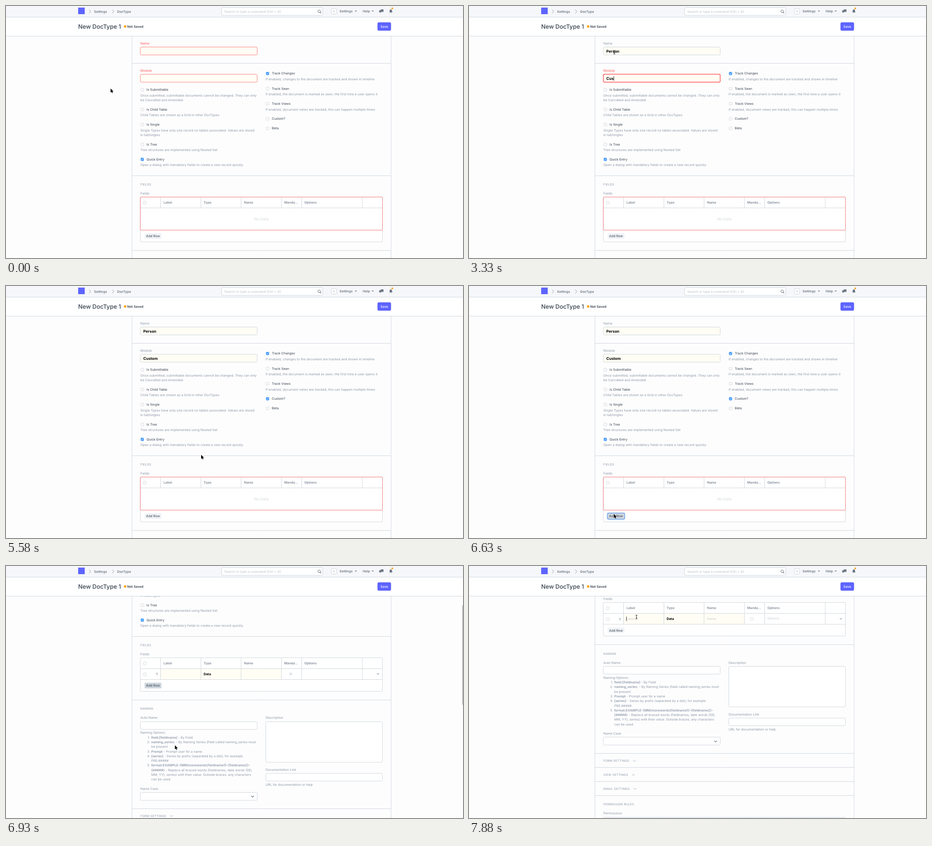
Animation of 1007x556 px, one loop 8 s. Source, as an HTML page with a canvas:

```html
<!DOCTYPE html>
<html lang="en">
<head>
<meta charset="utf-8">
<title>New DocType</title>
<style>
html, body { margin: 0; width: 100%; height: 100%; overflow: hidden; background: #fff; }
canvas { display: block; width: 1007px; height: 556px; }
</style>
</head>
<body>
<canvas id="stage"></canvas>
<script>
const W = 1007, H = 556, LOOP = 8000;
const canvas = document.getElementById('stage');
const dpr = window.devicePixelRatio || 1;
canvas.width = W * dpr;
canvas.height = H * dpr;
const ctx = canvas.getContext('2d');
ctx.textRendering = 'geometricPrecision';

const RED = '#ff5858', LINE = '#d1d8dd', MUTED = '#8d99a6', DARK = '#36414c';
const BEIGE = '#fffdf4', PAGE = '#fdfdfe', BRAND = '#5e64ff', ORANGE = '#ffa00a', BLUE = '#3b99fc';

let oy = 0; // scroll offset of whatever is being drawn
const snap = v => Math.round(v - 0.5) + 0.5;

function text(str, x, y, { color = MUTED, size = 7.18, weight = 400, align = 'left', spacing = 0 } = {}) {
  ctx.font = `${weight} ${size}px Inter, sans-serif`;
  ctx.letterSpacing = spacing + 'px';
  ctx.textAlign = align;
  ctx.fillStyle = color;
  ctx.fillText(str, x, y - oy + size * 0.364);
  return ctx.measureText(str).width;
}

function rect(x, y, w, h, { fill, stroke, r = 0, lw = 1 } = {}) {
  const top = snap(y - oy);
  ctx.beginPath();
  ctx.roundRect(x, top, w, h, r);
  if (fill) { ctx.fillStyle = fill; ctx.fill(); }
  if (stroke) { ctx.strokeStyle = stroke; ctx.lineWidth = lw; ctx.stroke(); }
}

function path(points, color, lw = 1, close = false) {
  ctx.beginPath();
  points.forEach(([x, y], i) => ctx[i ? 'lineTo' : 'moveTo'](x, y - oy));
  if (close) { ctx.closePath(); ctx.fillStyle = color; ctx.fill(); return; }
  ctx.strokeStyle = color;
  ctx.lineWidth = lw;
  ctx.stroke();
}

function hline(x1, x2, y, color = LINE) {
  const s = snap(y - oy) + oy;
  path([[x1, s], [x2, s]], color);
}

function vlines(xs, y1, y2) {
  xs.forEach(x => path([[x, y1], [x, y2]], LINE));
}

function dot(x, y, r, color) {
  ctx.beginPath();
  ctx.arc(x, y - oy, r, 0, Math.PI * 2);
  ctx.fillStyle = color;
  ctx.fill();
}

function chevron(x, y) {
  path([[x - 3, y - 1.5], [x, y + 1.5], [x + 3, y - 1.5]], MUTED, 0.8);
}

function triangle(x, y, w, h, color) {
  path([[x - w, y - h], [x + w, y - h], [x, y + h]], color, 1, true);
}

function checkbox(x, y, on) {
  const top = y - oy - 3.1;
  ctx.beginPath();
  ctx.roundRect(x - 3.1, top, 6.2, 6.2, 1.4);
  ctx.fillStyle = on ? BLUE : '#fff';
  ctx.fill();
  ctx.strokeStyle = on ? BLUE : '#c3c6ca';
  ctx.lineWidth = 0.7;
  ctx.stroke();
  if (on) path([[x - 1.7, y + 0.2], [x - 0.5, y + 1.6], [x + 1.8, y - 1.7]], '#fff', 1);
}

function check(x, y, label, notes = [], on = false) {
  checkbox(x + 4.3, y + 0.2, on);
  text(label, x + 13.7, y, { color: DARK });
  notes.forEach((n, i) => text(n, x, y + 12.6 + i * 10.3));
}

function heading(str, y, arrow) {
  const w = text(str, 296, y, { size: 6.6, spacing: 0.27 });
  if (arrow) chevron(296 + w + 11.5, y);
}

function field(label, y, { value = '', bad, focus, caret }) {
  text(label, 296, y, { color: bad ? RED : MUTED });
  rect(296, y + 8.2, 257.5, 17.5, { fill: BEIGE, stroke: bad ? RED : LINE, r: 2.4, lw: focus ? 1.5 : bad ? 0.75 : 1 });
  const w = text(value, 302.5, y + 17.5, { color: '#000', size: 8.4, weight: 700 });
  if (caret) caretLine(303 + w, y + 17.2);
}

function caretLine(x, y) {
  path([[x, y - 5], [x, y + 5]], '#111', 0.9);
}

function box(x, y, w, h) {
  rect(x, y, w, h, { fill: '#fff', stroke: LINE, r: 2.4 });
}

const columns = [340.5, 429.5, 518, 607, 651.5, 785];
const titles = [['Label', 347], ['Type', 435.5], ['Name', 524.5], ['Manda...', 613], ['Options', 657.5]];

function grid(s) {
  const bodyEnd = s.row ? 469.5 : 494.5, end = s.row ? 495.5 : 520.5;
  rect(296, 421.5, 533.5, end - 421.5, { fill: '#fff', stroke: LINE, r: 1.5 });
  if (s.row) {
    ctx.fillStyle = BEIGE;
    ctx.fillRect(341, 446 - oy, 266, 23);
  }
  vlines(columns, 422, s.row ? 469 : 445);
  hline(296, 829.5, 445.5);
  hline(296, 829.5, bodyEnd);
  checkbox(305.8, 434, false);
  titles.forEach(([t, x]) => text(t, x, 433, { weight: 600, color: '#7f8b98' }));

  if (s.row) {
    checkbox(305.8, 458, false);
    text('1', 334, 457.5, { color: DARK, align: 'right' });
    text('Data', 435.5, 457.3, { color: '#000', weight: 700 });
    triangle(819.5, 457.6, 3.5, 1.8, '#b8c2cc');
    if (s.edit) {
      const hint = { color: '#c7cfd6' };
      text('Label', 347, 457.3, hint);
      text('Name', 524.5, 457.3, hint);
      text('Options', 657.5, 456.2, hint);
      checkbox(623, 457.6, false);
      caretLine(347, 457.2);
    } else {
      ctx.fillStyle = '#e3e6e9';
      ctx.beginPath();
      ctx.roundRect(624.5, 454.2 - oy, 6, 6, 1.4);
      ctx.fill();
    }
  } else {
    rect(296, 421.5, 533.5, 73, { stroke: RED, r: 1.5, lw: 0.75 });
    text('No Data', 562.7, 470, { size: 8.4, color: '#d1d8dd', align: 'center' });
  }

  const by = s.row ? 476.5 : 501.5;
  if (s.ring) rect(305.5, by, 37, 12.5, { stroke: '#4f92ea', r: 2, lw: 2.4 });
  rect(305.5, by, 37, 12.5, { fill: s.pressed ? '#cdd5dc' : '#f0f4f7', r: 1.8 });
  text('Add Row', 324, by + 6, { color: DARK, align: 'center' });
}

// Each line: x, y, bold part, plain part, list number
const options = [
  [320, 378, 'field:[fieldname]', ' - By Field', '1.'],
  [320, 388.3, 'naming_series:', ' - By Naming Series (field called naming_series must', '2.'],
  [320, 398.6, '', 'be present'],
  [320, 408.9, 'Prompt', ' - Prompt user for a name', '3.'],
  [320, 419.2, '[series]', ' - Series by prefix (separated by a dot); for example', '4.'],
  [320, 429.5, '', 'PRE.#####'],
  [320, 439.8, 'format:EXAMPLE-{MM}morewords{fieldname1}-{fieldname2}-', '', '5.'],
  [320, 450.1, '{#####}', ' - Replace all braced words (fieldnames, date words (DD,'],
  [320, 460.4, '', 'MM, YY), series) with their value. Outside braces, any characters'],
  [320, 470.7, '', 'can be used.']
];

function lower() {
  hline(277.5, 848, 295.5);
  heading('NAMING', 315);
  text('Auto Name', 296, 334.5);
  box(296, 343.5, 257.5, 17);
  text('Naming Options:', 296, 367.7);
  options.forEach(([x, y, bold, plain, num]) => {
    if (num) text(num, 317.5, y, { align: 'right' });
    const w = bold ? text(bold, x, y, { weight: 600 }) : 0;
    text(plain, x + w, y);
  });
  text('Name Case', 296, 491);
  box(296, 499.5, 257.5, 17.5);
  path([[540.5, 507], [543.4, 510], [546.3, 507]], '#6c7680', 1.2);
  text('Description', 572, 334.5);
  box(572.5, 343.5, 257, 89.5);
  text('Documentation Link', 572, 449);
  box(572.5, 457.5, 257, 17);
  text('URL for documentation or help', 572, 482);

  ['FORM', 'VIEW', 'EMAIL'].forEach((name, i) => {
    hline(277.5, 848, 535.5 + i * 30.8);
    heading(name + ' SETTINGS', 551.5 + i * 30.8, true);
  });
  hline(277.5, 848, 628);
  heading('PERMISSION RULES', 647.6);
  text('Permissions', 296, 667);
  rect(296, 676, 533.5, 40, { fill: '#fff', stroke: LINE, r: 1.5 });
  vlines([340.5, 429.5, 518, 562.5, 607, 651.5, 696, 740.5, 785], 676.5, 716);
}

function form(s) {
  ctx.save();
  ctx.beginPath();
  ctx.rect(0, 66, W, H - 66);
  ctx.clip();
  path([[277.5, 60], [277.5, H]], LINE);
  path([[848.5, 60], [848.5, H]], LINE);
  oy = s.scroll;

  field('Name', 82.3, s.name);
  hline(277.5, 848, 126.5);
  field('Module', 142.7, s.module);

  check(296, 184.4, 'Is Submittable', [
    'Once submitted, submittable documents cannot be changed. They can only',
    'be Cancelled and Amended.']);
  check(296, 228, 'Is Child Table', ['Child Tables are shown as a Grid in other DocTypes']);
  check(296, 261.4, 'Is Single', [
    'Single Types have only one record no tables associated. Values are stored',
    'in tabSingles']);
  check(296, 305, 'Is Tree', ['Tree structures are implemented using Nested Set']);
  check(296, 338.2, 'Quick Entry', ['Open a dialog with mandatory fields to create a new record quickly'], true);

  check(572, 148.8, 'Track Changes', ['If enabled, changes to the document are tracked and shown in timeline'], true);
  check(572, 182.1, 'Track Seen', ['If enabled, the document is marked as seen, the first time a user opens it']);
  check(572, 215.4, 'Track Views', ['If enabled, document views are tracked, this can happen multiple times']);
  check(572, 248.7, 'Custom?', [], s.custom);
  check(572, 269.8, 'Beta');

  hline(277.5, 848, 374.5);
  heading('FIELDS', 394);
  text('Fields', 296, 413);
  grid(s);

  oy = s.scroll - (s.row ? 219 : 244);
  lower();
  oy = 0;
  ctx.restore();
}

function header() {
  const nav = { color: '#6c7680', weight: 600 };
  ctx.fillStyle = '#f5f7fa';
  ctx.fillRect(0, 0, W, 24);
  hline(0, W, 24.5);
  ctx.fillStyle = BRAND;
  ctx.fillRect(159, 3.5, 14.5, 14.5);
  [183, 234].forEach(x => path([[x, 8], [x + 3.8, 12], [x, 16]], MUTED, 0.9));
  text('Settings', 194, 12, nav);
  text('DocType', 245, 12, nav);

  box(475, 3.5, 223, 17);
  text('Search or type a command (Ctrl + G)', 481, 12, { color: '#b8c2cc' });
  ctx.beginPath();
  ctx.arc(690, 11.6, 2.8, 0, Math.PI * 2);
  ctx.strokeStyle = '#555e67';
  ctx.lineWidth = 0.9;
  ctx.stroke();
  path([[692, 13.6], [694.4, 16]], '#555e67', 1.1);

  rect(717, 5.5, 11.5, 12, { fill: '#fff', stroke: LINE, r: 2 });
  text('A', 722.8, 11.8, { color: '#b8c2cc', align: 'center' });
  text('Settings', 735, 11.5, nav);
  triangle(771, 11.5, 2.4, 1.2, '#6c7680');
  text('Help', 786, 11.5, nav);
  triangle(808, 11.5, 2.4, 1.2, '#6c7680');

  // Chat bubbles and bell
  const ink = '#6c7680';
  rect(825.5, 7.5, 6.3, 5, { fill: ink, r: 0.6 });
  path([[829, 12], [831, 12], [831, 14]], ink, 1, true);
  rect(822.3, 9.5, 5.6, 4.2, { fill: ink, r: 0.6 });
  path([[823.2, 13], [825.8, 13], [823.2, 15.5]], ink, 1, true);
  ctx.beginPath();
  ctx.moveTo(844.2, 13.7);
  ctx.quadraticCurveTo(845.6, 12.5, 845.6, 10);
  ctx.arc(848, 9.8, 2.4, Math.PI, 0);
  ctx.quadraticCurveTo(850.4, 12.5, 851.8, 13.7);
  ctx.closePath();
  ctx.fillStyle = ink;
  ctx.fill();
  dot(848, 14.3, 1, ink);
  dot(851.2, 5.2, 1.9, ORANGE);

  ctx.fillStyle = '#fff';
  ctx.fillRect(0, 25, W, 41);
  hline(0, W, 66.5);
  text('New DocType 1', 159, 45.2, { color: DARK, size: 12.95, weight: 500 });
  dot(262.6, 45.2, 2.6, ORANGE);
  text('Not Saved', 267, 45.2, { color: DARK, weight: 600 });
  rect(819, 36.5, 29, 17.5, { fill: BRAND, stroke: '#444bff', r: 2.2, lw: 0.7 });
  text('Save', 833.5, 45.2, { color: '#fff', weight: 500, align: 'center' });
}

function outline(points, x, y, fill, edge) {
  ctx.beginPath();
  points.forEach(([px, py], i) => ctx[i ? 'lineTo' : 'moveTo'](x + px, y + py));
  ctx.closePath();
  ctx.lineJoin = 'round';
  ctx.strokeStyle = edge;
  ctx.lineWidth = 1;
  ctx.stroke();
  ctx.fillStyle = fill;
  ctx.fill();
}

const shapes = {
  arrow(x, y) {
    outline([[0, 0], [0, 9], [2, 7.2], [3.4, 10.3], [4.9, 9.6], [3.6, 6.6], [6.3, 6.4]], x, y, '#000', '#fff');
  },
  hand(x, y) {
    outline([[-1.4, 0], [0.2, 0], [0.6, 3.2], [2, 3], [2.5, 3.6], [4, 3.6], [4.4, 4.3], [5.6, 4.8],
      [5.4, 7.4], [4.4, 9.6], [0, 9.6], [-2.6, 6.3], [-2.2, 5.2], [-0.8, 6]], x, y, '#fff', '#111');
  },
  beam(x, y) {
    path([[x, y - 4], [x, y + 4]], '#111', 0.9);
    [-4, 4].forEach(d => path([[x - 2.2, y + d * 1.1], [x, y + d * 0.9], [x + 2.2, y + d * 1.1]], '#111', 0.8));
    path([[x - 1.2, y + 1.5], [x + 1.2, y + 1.5]], '#111', 0.7);
  }
};

// Waypoints: time, x, y
const route = [
  [300, 230.5, 182], [600, 250, 168], [900, 305, 118], [1050, 320.2, 102],
  [3780, 320.2, 102], [4080, 410, 150], [4380, 630, 240], [4530, 606, 247], [4680, 598.8, 246.3],
  [4980, 598.8, 246.3], [5130, 612, 252], [5430, 500, 330], [5730, 360, 415], [5880, 340, 450],
  [6180, 322, 498], [6330, 319.2, 503], [6630, 319.2, 503], [6780, 340, 470], [6930, 372.2, 395.5],
  [7100, 374, 380], [7412, 371, 190], [7568, 369, 112.5]
];
const scrolling = [[6630, 0], [6780, 35], [6930, 219], [7100, 290], [7256, 327], [7412, 340.6]];

function along(keys, t) {
  const next = keys.findIndex(k => k[0] > t);
  if (next === 0) return keys[0].slice(1);
  if (next < 0) return keys[keys.length - 1].slice(1);
  const a = keys[next - 1], b = keys[next], p = (t - a[0]) / (b[0] - a[0]);
  return a.slice(1).map((v, i) => v + (b[i + 1] - v) * p);
}

// The screen advances about every 150 ms
function tick(t) {
  if (t < 1380) return Math.min(1200, Math.floor(t / 150) * 150);
  if (t < 7100) return Math.min(6930, Math.floor((t - 30) / 150) * 150 + 30);
  return 7100 + Math.floor((t - 7100) / 156) * 156;
}

function typed(word, t, stops) {
  return word.slice(0, stops.reduce((n, [at, len]) => (t >= at ? len : n), 0));
}

function pointerKind(t, x, y) {
  if (t >= 4530 && t < 5130) return 'hand';
  if (t >= 7568) return 'beam';
  return t < 4080 && y < 110 ? 'beam' : 'arrow';
}

function draw(now) {
  const t = tick(now % LOOP);
  const onName = t >= 1200 && t < 2280, onModule = t >= 2280 && t < 4830;
  const state = {
    scroll: along(scrolling, t)[0],
    name: {
      value: typed('Person', t, [[1380, 1], [1680, 3], [1830, 5], [1980, 6]]),
      bad: t < 2280, focus: onName, caret: onName
    },
    module: {
      value: typed('Custom', t, [[3030, 1], [3330, 3], [3480, 5], [3630, 6]]),
      bad: t < 4830, focus: onModule, caret: onModule && t < 3930 && t !== 2880
    },
    custom: t >= 4830,
    row: t >= 6780,
    ring: t === 6630,
    pressed: t >= 6480 && t < 7412,
    edit: t >= 7724
  };

  ctx.setTransform(dpr, 0, 0, dpr, 0, 0);
  ctx.fillStyle = PAGE;
  ctx.fillRect(0, 0, W, H);
  form(state);
  header();
  if (t >= 6780 && t < 7724) {
    ctx.fillStyle = '#c1c3c6';
    ctx.beginPath();
    ctx.roundRect(1005, state.scroll * 0.394, 3, 220, 1);
    ctx.fill();
  }
  const [x, y] = along(route, t);
  shapes[pointerKind(t, x, y)](x, y);
}

function frame() {
  draw(performance.now());
  requestAnimationFrame(frame);
}
frame();
</script>
</body>
</html>
```
